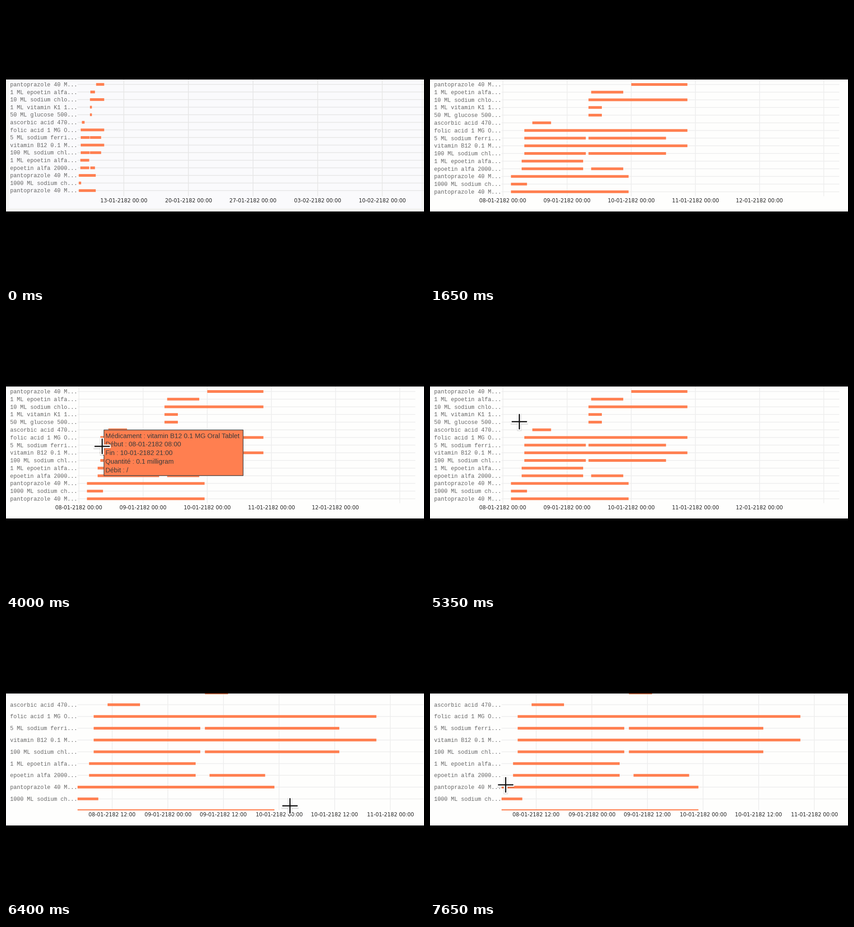
A matplotlib script that plays this animation: 917 px wide and 611 px high, repeating every 8000 ms.

```python
import numpy as np
import matplotlib.pyplot as plt
from matplotlib.animation import FuncAnimation
from matplotlib.collections import LineCollection, PolyCollection
from matplotlib.patches import PathPatch, Polygon, Rectangle
from matplotlib.path import Path

W, H, DPI = 917, 611, 100
PX = 72 / DPI
STEP, LOOP = 50, 8000
TOP, BOTTOM = 161, 449.5
LEFT, AXIS = 157, 416.5
ORANGE, WHITE = "#ff7f50", "#fefefd"

# Bar spans, in hours after 08-01-2182 00:00
STAY, BRIEF, LATE = (8, 69), (32, 37), (33, 45)
NIGHT, LONG = (7, 30), (3, 47)
SPLIT = [(8, 31), (32, 61)]

# Full name, bars, quantity, rate
ROWS = [
    ("pantoprazole 40 MG Injection", [(48, 69)], "40 milligram", "/"),
    ("1 ML epoetin alfa 2000 UNT/ML Injection", [LATE], "2000 unit", "/"),
    ("10 ML sodium chloride 9 MG/ML Injection", [(32, 69)], "10 ml", "/"),
    ("1 ML vitamin K1 10 MG/ML Injection", [BRIEF], "10 milligram", "/"),
    ("50 ML glucose 500 MG/ML Injection", [BRIEF], "25 gram", "/"),
    ("ascorbic acid 470 MG Oral Tablet", [(11, 18)], "470 milligram", "/"),
    ("folic acid 1 MG Oral Tablet", [STAY], "1 milligram", "/"),
    ("5 ML sodium ferric gluconate complex 12.5 MG/ML Injection", SPLIT,
     "625 milligram", "27.2 milligram per hour"),
    ("vitamin B12 0.1 MG Oral Tablet", [STAY], "0.1 milligram", "/"),
    ("100 ML sodium chloride 9 MG/ML Injection", SPLIT, "100 ml", "/"),
    ("1 ML epoetin alfa 2000 UNT/ML Injection", [NIGHT], "2000 unit", "/"),
    ("epoetin alfa 2000 UNT/ML Injectable Solution Multidose",
     [NIGHT, LATE], "2000 unit", "/"),
    ("pantoprazole 40 MG Injection", [LONG], "40 milligram", "/"),
    ("1000 ML sodium chloride 9 MG/ML Injection", [(3, 9)], "1000 ml", "/"),
    ("pantoprazole 40 MG Injection", [LONG], "40 milligram", "/"),
]

# Cursor moves: departure ms, arrival ms, x, y
ENTRY = (177, 215)
MOVES = [
    (50, 500, 263.5, 414), (900, 1400, 130, 150), (1900, 2650, 208, 272),
    (2800, 3250, 208, 307), (3850, 3950, 211, 292), (5050, 5250, 196, 238),
    (5400, 5600, 187, 238), (5700, 6050, 482, 336), (6050, 6350, 623, 407),
    (6750, 6850, 580, 368), (6850, 6950, 503, 340), (6950, 7250, 200, 240),
    (7250, 7550, 166, 361),
]
DRAGS = [(900, 1650), (5750, 6400)]
BOX_LAG, HOVER_LAG, HOVER_REACH = 20, 100, 25


def date(hour):
    day, hh = divmod(hour, 24)
    return f"{8 + day:02d}-01-2182 {hh:02d}:00" if day < 24 else \
        f"{day - 23:02d}-02-2182 {hh:02d}:00"


def cursor_at(t):
    pos = np.array(ENTRY, float)
    for start, end, x, y in MOVES:
        if t <= start:
            break
        pos += (np.array((x, y)) - pos) * min(1, (t - start) / (end - start))
    return pos


def cursor_on(t):
    return 50 <= t < 1650 or t >= 1950


def drag_box(t):
    for start, end in DRAGS:
        if start <= t < end:
            # the box trails the pointer slightly
            ends = np.array([cursor_at(start - STEP), cursor_at(t - BOX_LAG)])
            ends = np.maximum(ends, (LEFT, 158))
            return (*ends.min(axis=0), *ends.max(axis=0))
    return None


def view_at(t):
    return views[sum(t >= end for _, end in DRAGS)]


fig = plt.figure(figsize=(W / DPI, H / DPI), dpi=DPI, facecolor="black")
ax = fig.add_axes([0, 0, 1, 1])
ax.set_xlim(0, W)
ax.set_ylim(H, 0)
ax.axis("off")


def rect(x0, y0, x1, y1, color, z=0):
    return ax.add_patch(Rectangle((x0, y0), x1 - x0, y1 - y0, fc=color,
                                  ec="none", zorder=z))


def clip(artist, x0, y0, x1, y1):
    artist.set_clip_path(Rectangle((x0, y0), x1 - x0, y1 - y0,
                                   transform=ax.transData))


def lines(segs, color, width, z):
    coll = LineCollection(segs, colors=color, linewidths=width * PX,
                          capstyle="butt", zorder=z, snap=False)
    return ax.add_collection(coll)


def text(x, y, s, font, size, color, ha="left", z=3):
    return ax.text(x, y, s, family=font, fontsize=size * PX, color=color,
                   ha=ha, va="baseline", zorder=z)


class View:
    """One zoom state of the chart."""

    def __init__(self, x0, per_hour, y0, dy, ticks, right, grid,
                 last_label=True, tinted=False):
        self.x0, self.per_hour, self.y0, self.dy = x0, per_hour, y0, dy
        self.right = right
        self.rows = [i for i in range(len(ROWS)) if TOP < self.y(i) < AXIS]
        self.parts = []
        if tinted:
            self.parts += [rect(0, TOP, W, BOTTOM, "#f5f5f3"),
                           rect(7, TOP, 911, 443, "#fafafc")]
        mesh = [[(self.x(h), TOP), (self.x(h), AXIS)] for h in ticks]
        mesh += [[(LEFT, self.y(i)), (right, self.y(i))] for i in self.rows]
        bars = [[(self.x(a), self.y(i)), (self.x(b), self.y(i))]
                for i, row in enumerate(ROWS) for a, b in row[1]]
        bar_art = lines(bars, ORANGE, 5.9, 2)
        clip(bar_art, LEFT, TOP, right, AXIS)
        self.parts += [lines(mesh, grid, 1.6, 1), bar_art]
        for i in self.rows:
            self.parts.append(text(9, self.y(i) + 4.2, ROWS[i][0][:17] + "...",
                                   "Liberation Mono", 12.28, "#666666"))
        for h in ticks if last_label else ticks[:-1]:
            self.parts.append(text(self.x(h), 429.6, date(h), "DejaVu Sans",
                                   11.55, "#222222", "center"))

    def x(self, hour):
        return self.x0 + hour * self.per_hour

    def y(self, row):
        return self.y0 + row * self.dy

    def show(self, on):
        for part in self.parts:
            part.set_visible(on)

    def nearest(self, x, y):
        """Row and hour of the closest visible bar end within reach."""
        ends = [(np.hypot(self.x(h) - x, self.y(i) - y), i, h)
                for i in self.rows for span in ROWS[i][1] for h in span
                if self.x(h) >= LEFT]
        dist, row, hour = min(ends)
        return (row, hour) if dist < HOVER_REACH else None


class Tooltip:
    def __init__(self):
        self.box = ax.add_patch(Polygon([(0, 0)] * 3, fc=ORANGE, ec="#444444",
                                        lw=1.4 * PX, zorder=6, snap=False))
        self.rows = [text(0, 0, "", "Liberation Sans", 14.5, "#3a3a3a", z=7)
                     for _ in range(5)]

    def update(self, view, spot):
        for part in [self.box] + self.rows:
            part.set_visible(spot is not None)
        if spot is None:
            return
        row, hour = spot
        name, spans, amount, rate = ROWS[row]
        start, end = next(s for s in spans if hour in s)
        content = [f"Médicament : {name}", f"Début : {date(start)}",
                   f"Fin : {date(end)}", f"Quantité : {amount}",
                   f"Débit : {rate}"]
        px, py = view.x(hour), view.y(row)
        x = px + 8
        for k, (line, s) in enumerate(zip(self.rows, content)):
            line.set_text(s)
            line.set_position((x + 3.5, py - 32.4 + 18.7 * k))
        x1 = x + self.rows[0].get_window_extent().width + 11
        y0, y1 = py - 50, py + 50
        self.box.set_xy([(px, py), (x, py - 6), (x, y0), (x1, y0), (x1, y1),
                         (x, y1), (x, py + 6)])


class Selection:
    """Dimmed plot with a bright zoom box and four corner marks."""

    def __init__(self):
        self.shade = ax.add_patch(PathPatch(Path([(0, 0)] * 3), fc="black",
                                            ec="none", alpha=0.4, zorder=4))
        self.marks = ax.add_collection(PolyCollection(
            [], facecolors="white", edgecolors="#444444",
            linewidths=1.1 * PX, zorder=5))
        clip(self.marks, 0, TOP, W, BOTTOM)

    def update(self, view, box):
        self.shade.set_visible(box is not None)
        self.marks.set_visible(box is not None)
        if box is None:
            return
        x0, y0, x1, y1 = box
        outer = [(LEFT, TOP), (view.right, TOP), (view.right, AXIS),
                 (LEFT, AXIS), (LEFT, TOP)]
        t = max(y0, TOP)
        inner = [(x0, t), (x0, y1), (x1, y1), (x1, t), (x0, t)]
        self.shade.set_path(Path.make_compound_path(Path(outer), Path(inner)))
        arm = min(11, (x1 - x0) / 2, (y1 - y0) / 2)
        shape = np.array([(3.5, 0.5 - arm), (0.5, 0.5 - arm), (0.5, 0.5),
                          (0.5 - arm, 0.5), (0.5 - arm, 3.5), (3.5, 3.5)])
        self.marks.set_verts([shape * (sx, sy) + (x, y)
                              for x, sx in ((x0, -1), (x1, 1))
                              for y, sy in ((y0, -1), (y1, 1))])


class Cursor:
    # Half length, width, colour, drop
    LAYERS = [(19, 10, (0, 0, 0, 0.12), 1.5), (18.7, 8, "white", 0),
              (16.8, 2.6, "#101010", 0)]

    def __init__(self):
        self.layers = []
        for k, (_, width, color, _) in enumerate(self.LAYERS):
            layer = lines([], color, width, 8 + k)
            clip(layer, 0, TOP, W, BOTTOM)
            self.layers.append(layer)

    def update(self, x, y, on):
        for layer, (r, _, _, drop) in zip(self.layers, self.LAYERS):
            layer.set_visible(on)
            v = y + drop
            layer.set_segments([[(x - r, v), (x + r, v)],
                                [(x, v - r), (x, v + r)]])


rect(0, TOP, W, BOTTOM, WHITE, -1)
month = View(157.2, 0.84375, 171.7, 16.61, range(120, 800, 168), W,
             "#e7e7e7", tinted=True)
week = View(160, 5.865, 171.9, 16.78, range(0, 121, 24), 898, "#eeeeee",
            last_label=False)
days = View(111, 10.167, 56.6, 25.78, range(12, 73, 12), 916, "#eeeeee")
views = [month, week, days]
tip, selection, cursor = Tooltip(), Selection(), Cursor()


def draw(frame):
    t = frame * STEP
    view, box = view_at(t), drag_box(t)
    for v in views:
        v.show(v is view)
    seen = t - HOVER_LAG
    hovering = box is None and view_at(seen) is view and cursor_on(seen)
    tip.update(view, view.nearest(*cursor_at(seen)) if hovering else None)
    selection.update(view, box)
    cursor.update(*cursor_at(t), cursor_on(t))
    return []


anim = FuncAnimation(fig, draw, frames=LOOP // STEP, interval=STEP,
                     init_func=lambda: draw(0), repeat=True, repeat_delay=0,
                     blit=False)
plt.show()
```
